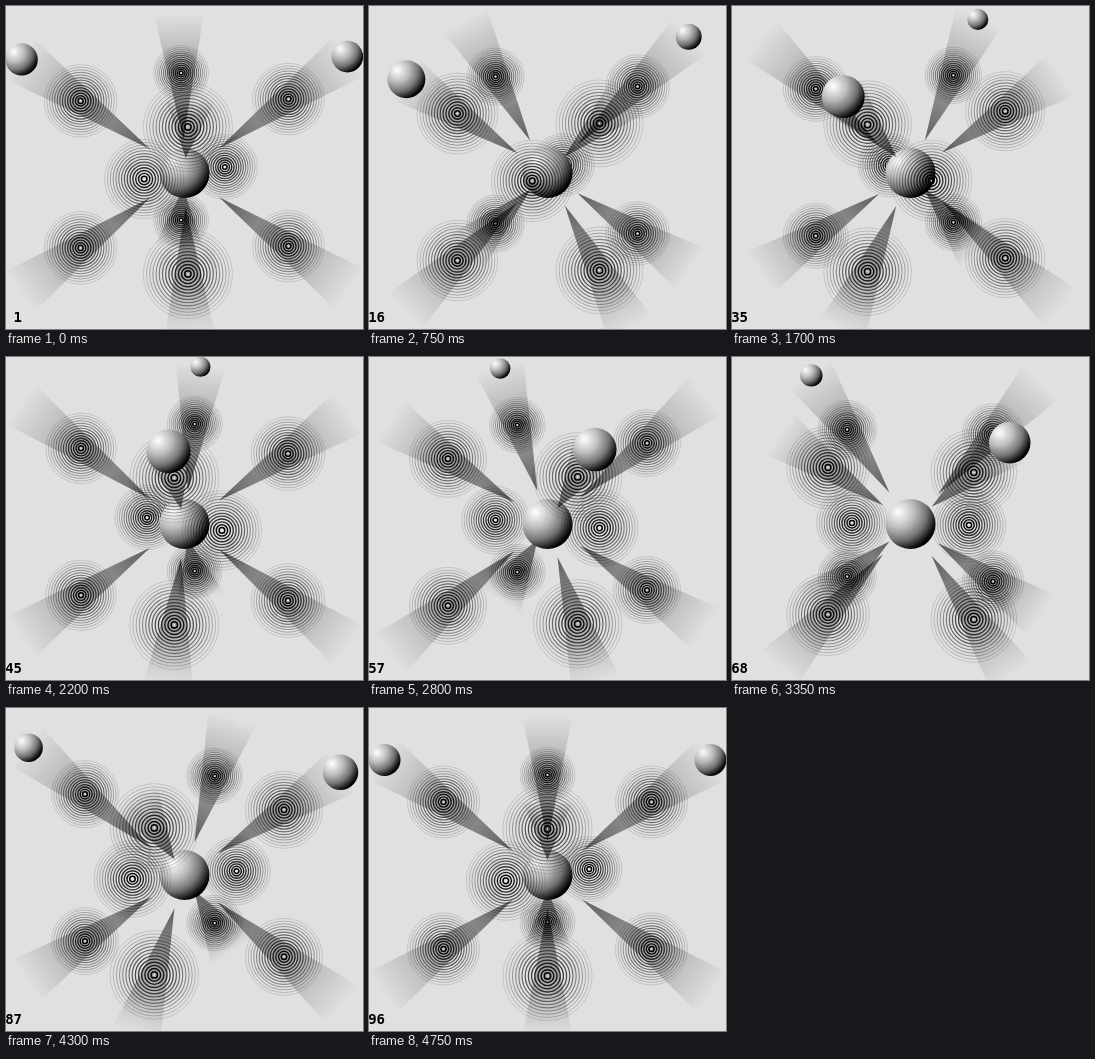
Write an HTML page with a canvas that moves like this. It is 357 by 323 pixels and loops after 4800 ms.

```html
<!DOCTYPE html>
<html>
<head>
<meta charset="utf-8">
<style>
html, body { margin: 0; width: 100%; height: 100%; overflow: hidden; background: #e0e0e0; }
canvas { display: block; }
</style>
</head>
<body>
<canvas id="stage" width="357" height="323"></canvas>
<script>
const ctx = document.getElementById('stage').getContext('2d');
const CX = 178.5, CY = 167, TILT = 0.26;
const STEPS = 96, STEP_MS = 50, RINGS = 14;
const REACH = 1.57; // cone length relative to the ring centre

const black = alpha => `rgba(0,0,0,${alpha})`;
const depthScale = z => 1 + 0.0023 * z;

// Point on a horizontal orbit, relative to the centre; z points at the viewer.
function orbit(angle, radius, height, tilt = TILT) {
  const z = radius * Math.cos(angle);
  return { x: radius * Math.sin(angle), y: height + z * tilt, z };
}

function ball(x, y, r) {
  const hx = x - 0.48 * r, hy = y - 0.48 * r;
  const shade = ctx.createRadialGradient(hx, hy, 0, hx, hy, 1.6 * r);
  shade.addColorStop(0, '#fff');
  shade.addColorStop(0.4, '#bcbcbc');
  shade.addColorStop(0.7, '#747474');
  shade.addColorStop(0.92, '#1c1c1c');
  shade.addColorStop(1, '#000');
  ctx.fillStyle = shade;
  ctx.beginPath();
  ctx.arc(x, y, r, 0, 2 * Math.PI);
  ctx.fill();
}

function rings({ x, y, z }) {
  const size = 36 * depthScale(z);
  for (let k = 1; k <= RINGS; k++) {
    const fade = (k - 1) / (RINGS - 1);
    ctx.lineWidth = 1.5 - 0.6 * fade;
    ctx.strokeStyle = black(1 - 0.86 * fade);
    ctx.beginPath();
    ctx.arc(CX + x, CY + y, size * k / RINGS, 0, 2 * Math.PI);
    ctx.stroke();
  }
  ctx.fillStyle = '#eee';
  ctx.beginPath();
  ctx.arc(CX + x, CY + y, 0.8, 0, 2 * Math.PI);
  ctx.fill();
}

function cone({ x, y }) {
  const length = Math.hypot(x, y);
  const tipX = CX + x / 3, tipY = CY + y / 3;
  const endX = CX + x * REACH, endY = CY + y * REACH;
  const nx = -y / length * 24.5, ny = x / length * 24.5;
  const fade = ctx.createLinearGradient(tipX, tipY, endX, endY);
  fade.addColorStop(0, black(0.58));
  fade.addColorStop(0.5, black(0.28));
  fade.addColorStop(1, black(0.01));
  ctx.fillStyle = fade;
  ctx.beginPath();
  ctx.moveTo(tipX, tipY);
  ctx.lineTo(endX + nx, endY + ny);
  ctx.lineTo(endX - nx, endY - ny);
  ctx.fill();
}

function draw(count) {
  const turn = Math.PI * count / STEPS;
  const parts = [{ z: 0, paint: () => ball(CX, CY, 25) }];
  const add = (p, paint) => parts.push({ z: p.z, paint: () => paint(p) });

  for (let i = 0; i < 4; i++) {
    for (const height of [-73, 74]) {
      add(orbit(turn + i * Math.PI / 2, 104, height), p => { cone(p); rings(p); });
    }
  }
  for (const side of [0, Math.PI]) {
    add(orbit(turn - Math.PI / 4 + side, 59, 0, 0.14), rings);
    add(orbit(turn - Math.PI / 2 + side, 163, -115),
      p => ball(CX + p.x, CY + p.y, 16 * depthScale(p.z)));
  }

  ctx.fillStyle = '#e0e0e0';
  ctx.fillRect(0, 0, 357, 323);
  parts.sort((a, b) => a.z - b.z).forEach(part => part.paint());

  ctx.fillStyle = '#000';
  ctx.font = 'bold 14px "DejaVu Sans Mono", monospace';
  ctx.textAlign = 'right';
  ctx.fillText(count, 16, 316);
}

const start = performance.now();
function tick() {
  const elapsed = Math.max(0, performance.now() - start);
  draw(1 + Math.floor(elapsed / STEP_MS) % STEPS);
  requestAnimationFrame(tick);
}
tick();
</script>
</body>
</html>
```
